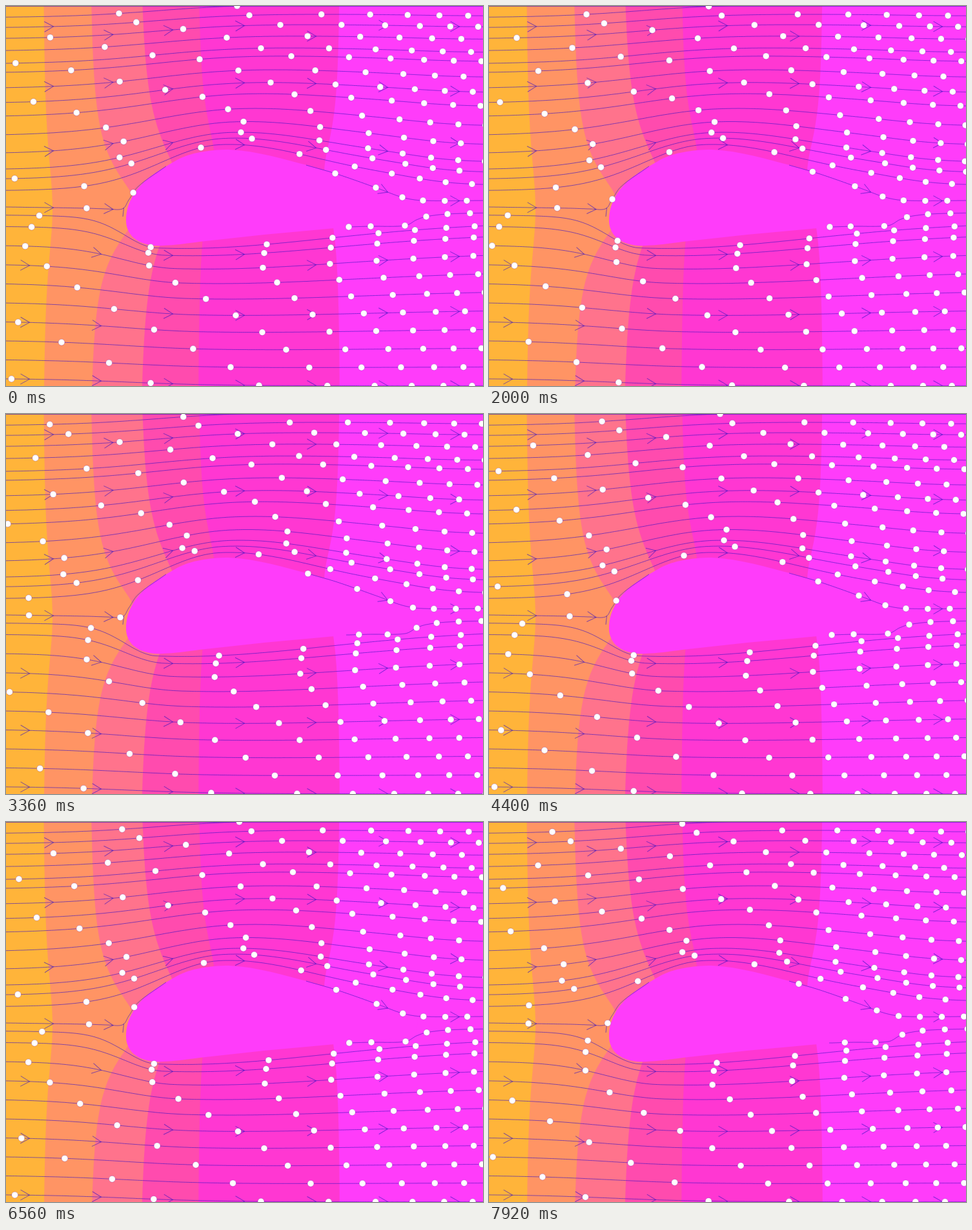
An HTML page that plays this animation: 739 by 590 pixels, repeating every 8 s.

```html
<!DOCTYPE html>
<html lang="en">
<head>
<meta charset="utf-8">
<title>Flow around an airfoil</title>
<style>
html, body { margin: 0; width: 100%; height: 100%; overflow: hidden; background: #ffb43a; }
svg { display: block; width: 739px; height: 590px; }
.flow { fill: none; stroke: #3714c0; stroke-opacity: .62; stroke-width: 1; }
.dot { fill: #fff; stroke: #5a0096; stroke-opacity: .4; stroke-width: .6; }
</style>
</head>
<body>
<svg id="stage" viewBox="0 0 739 590"></svg>
<script>
const W = 739, H = 590, LOOP = 8000, TICK = 80, CYCLE = 55, DT = .02;
const stage = document.getElementById('stage');

function add(tag, attrs) {
  const el = document.createElementNS('http://www.w3.org/2000/svg', tag);
  for (const k in attrs) el.setAttribute(k, attrs[k]);
  return stage.appendChild(el);
}

const toPath = pts => 'M' + pts.map(p => p[0].toFixed(1) + ' ' + p[1].toFixed(1)).join('L');
const mix = (a, b, u) => a + (b - a) * u;
const bell = (x, mid, width) => Math.exp(-(((x - mid) / width) ** 2));
const rise = (x, mid, width) => 1 / (1 + Math.exp((mid - x) / width));

// Speed bands: each left edge bulges around one height
add('rect', { width: W, height: H, fill: '#ffb43a' });
function band(fill, base, bulge, mid, width) {
  const pts = [[W, 0]];
  for (let y = 0; y <= H; y += 5) pts.push([base + bulge / (1 + ((y - mid) / width) ** 2), y]);
  add('path', { d: toPath([...pts, [W, H]]) + 'Z', fill });
}
band('#ff9464', 57, 15, 315, 110);
band('#ff738c', 129, 73, 315, 70);
band('#ff4bae', 206, 62, 285, 90);
band('#ff37d2', 297, 26, 240, 80);
band('#ff3cfa', 518, -25, 260, 75);

add('path', {
  fill: '#ff3cfa',
  d: 'M186 333C186 312 194 292 215 272C232 257 248 249 265 239C285 228 315 223 345 223' +
    'C390 225 430 238 470 248C520 262 570 280 638 308L635 333L509 345L400 355L300 366' +
    'C270 370 250 373 230 372C200 369 186 353 186 333Z'
});

// Flow field: streams that start nearer the nose are disturbed more
const NOSE = 313;
const closeness = seed => Math.exp(-Math.abs(seed - NOSE) / 120);

function height(seed, x) {
  const n = closeness(seed);
  const hump = (mid, left, right) => bell(x, mid, x < mid ? left : right);
  if (seed < NOSE) {
    return seed - 20 * rise(x, 235, 70) + 14 * n * rise(x, 640, 30) -
      (76 * n - 5.5) * hump(385 - 65 * n, 243 - 140 * n, 238 - 50 * n);
  }
  return seed + 11.5 * rise(x, 190, 70) +
    (55 * n - 6) * hump(320 - 95 * n, 205 - 150 * n, 355);
}

function speed(seed, x) {
  const n = Math.exp(-Math.abs(seed - NOSE) / 100), above = seed < NOSE;
  const change = .24 * bell(x, above ? 350 : 250, 90) - .4 * bell(x, 120, 80) -
    (above ? .27 * bell(x, 630, 70) : 0);
  return (35 + 200 * rise(-x, -385, 104)) * (1 + n * change);
}

// Stream from the left edge; one particle passes the anchor at time zero
function release(seed, anchor) {
  const pts = [];
  let phase = 0;
  for (let x = 0, y = seed; x < W + 9 && y > -.5; y = height(seed, x)) {
    pts.push([x, height(seed, x)]);
    const half = x + speed(seed, x) * DT / 2, next = x + speed(seed, half) * DT;
    if (x <= anchor && anchor < next) phase = (pts.length - 1 + (anchor - x) / (next - x)) * DT;
    x = next;
  }
  return { pts, phase };
}

// Stream that hugs the body, through a few [time, x, y] points
function trace(keys) {
  const pts = [], start = keys[0][0], last = keys.length - 1;
  const slope = (i, c) => {
    const a = keys[Math.max(0, i - 1)], b = keys[Math.min(last, i + 1)];
    return (b[c] - a[c]) / (b[0] - a[0]);
  };
  for (let t = start, i = 0; t <= keys[last][0]; t += DT) {
    while (t > keys[i + 1][0]) i++;
    const a = keys[i], b = keys[i + 1], h = b[0] - a[0], u = (t - a[0]) / h, v = 1 - u;
    pts.push([1, 2].map(c => v * v * (1 + 2 * u) * a[c] + u * u * (3 - 2 * u) * b[c] +
      h * u * v * (v * slope(i, c) - u * slope(i + 1, c))));
  }
  return { pts, phase: -start };
}

// [seed height, anchor]
const upper = [[18, 358], [34, 377], [51, 425], [70, 342], [90, 395], [104, 442], [128, 360],
  [151, 410], [172, 447], [201, 344], [229, 368], [254, 364], [269, 381], [287, 302], [324, 404]];
const lower = [400, 398, 420, 447, 356, 397, 434, 348, 392];

const streams = [
  ...upper.map(([seed, anchor]) => release(seed, anchor)),
  ...lower.map((anchor, i) => release(341.8 + 29.55 * i, anchor)),
  trace([[-.69, 0, 312], [0, 125, 314], [.25, 155, 315], [.55, 180, 315], [.886, 191, 300],
    [1.1, 205, 280], [1.5, 249, 248]]),
  trace([[-.53, 465, 247], [0, 510, 260], [1, 573, 282], [2, 614, 297], [3, 646, 302], [6, 748, 302]]),
  trace([[-.15, 527, 343], [0, 531, 343], [1, 565, 342], [2, 618, 341], [2.5, 636, 332],
    [3, 651, 327], [4, 684, 323], [6, 754, 321]])
];

add('path', { class: 'flow', d: 'M0 .5H739M181 327L182.5 313' });
for (const s of streams) add('path', { class: 'flow', d: toPath(s.pts) });

// Chevron on the stream nearest to a grid point
function chevron(x, y) {
  let best = null, gap = 20;
  for (const { pts } of streams) {
    const i = pts.findIndex(p => p[0] >= x);
    if (i < 1) continue;
    const a = pts[i - 1], b = pts[i], ty = mix(a[1], b[1], (x - a[0]) / (b[0] - a[0]));
    if (Math.abs(ty - y) < gap) {
      gap = Math.abs(ty - y);
      best = [ty, Math.atan2(b[1] - a[1], b[0] - a[0]) * 180 / Math.PI];
    }
  }
  if (best) add('path', { class: 'flow', d: 'M-14 -8L0 0L-14 8', transform: `translate(${x} ${best[0]}) rotate(${best[1]})` });
}
for (let row = 0; row < 7; row++) {
  for (let col = 0; col < 7; col++) {
    const nudge = row < 4 && col < 2 ? 37 / (col + 1) : 0;
    chevron(36.5 + 111 * col + nudge, 38 + 89.6 * row);
  }
}

for (const s of streams) {
  s.dots = Array.from({ length: Math.ceil(s.pts.length * DT) + 1 }, () => add('circle', { class: 'dot', r: 4.9 }));
}

// Uneven pace: [tick, travel time reached]
const paceKeys = [[0, 0], [16, .616], [25, .886], [27, 1.023], [42, 1.503], [44, 1.64], [CYCLE, 2]];
function pace(tick) {
  const i = paceKeys.findIndex(k => k[0] > tick), [a, from] = paceKeys[i - 1], [b, to] = paceKeys[i];
  return mix(from, to, (tick - a) / (b - a));
}

function draw(ms) {
  const shift = pace(Math.floor((ms % LOOP) / TICK) % CYCLE);
  for (const s of streams) {
    const first = (s.phase + shift) % 1;
    s.dots.forEach((dot, k) => {
      const at = (first + k) / DT, i = Math.floor(at);
      const shown = i < s.pts.length - 1;
      dot.setAttribute('visibility', shown ? 'visible' : 'hidden');
      if (!shown) return;
      const a = s.pts[i], b = s.pts[i + 1];
      dot.setAttribute('cx', mix(a[0], b[0], at - i).toFixed(2));
      dot.setAttribute('cy', mix(a[1], b[1], at - i).toFixed(2));
    });
  }
}

const start = performance.now();
function tick() {
  draw(Math.max(0, performance.now() - start));
  requestAnimationFrame(tick);
}
draw(0);
requestAnimationFrame(tick);
</script>
</body>
</html>
```
